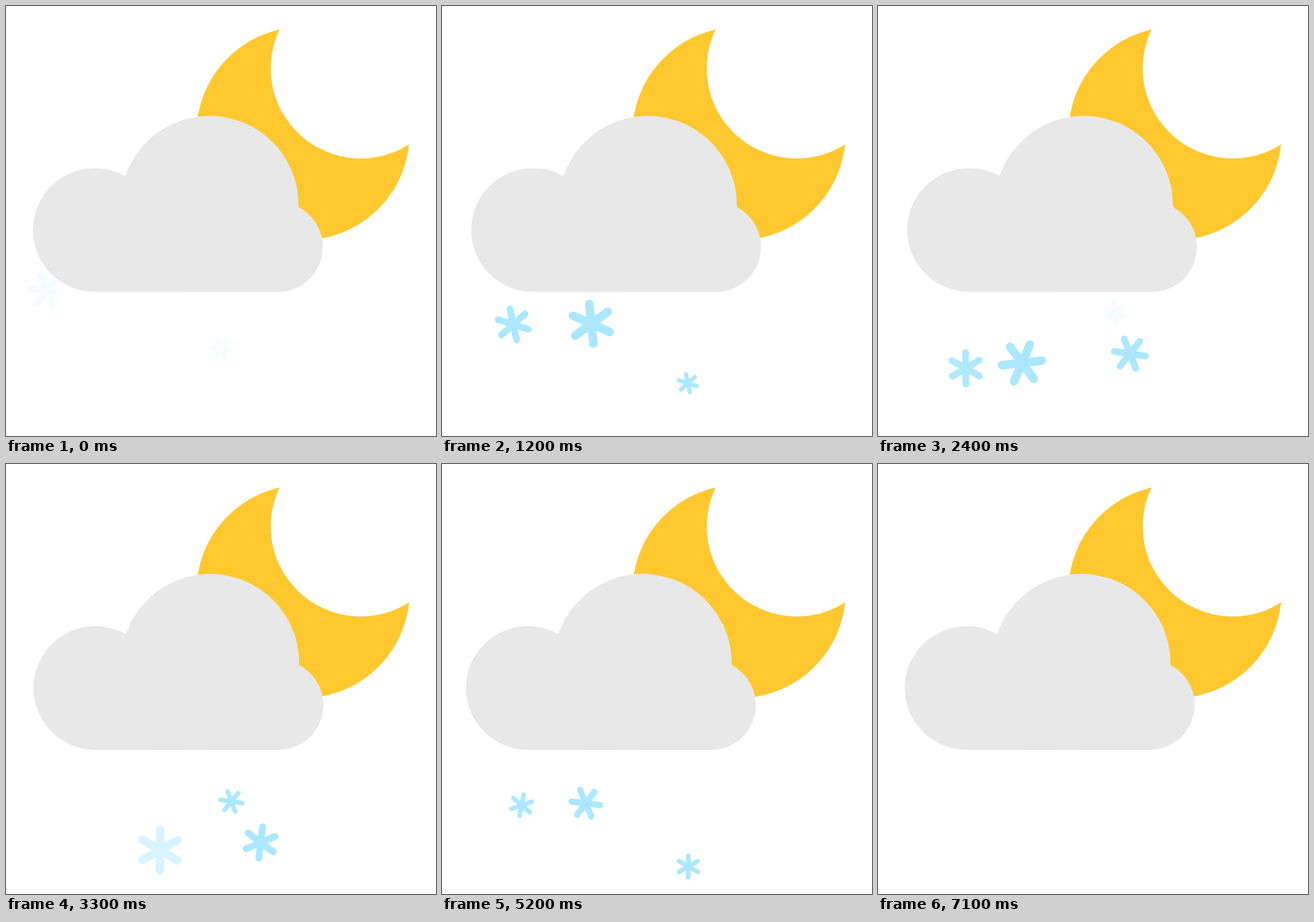
An HTML page with a canvas for the animation above (7200 ms loop, 640 by 640 pixels).

```html
<!DOCTYPE html>
<html lang="en">
<head>
<meta charset="utf-8">
<title>Snowy night</title>
<style>
html, body { margin: 0; width: 100%; height: 100%; overflow: hidden; background: #fff; }
canvas { display: block; width: 100vmin; height: 100vmin; }
</style>
</head>
<body>
<canvas id="stage" width="640" height="640"></canvas>
<script>
const ctx = document.getElementById('stage').getContext('2d');
const LOOP = 7200, STEP = 100, FADE = 200;
const DEGREE = Math.PI / 180;

// Velocity and bend in px per second, spin in degrees per second
const drift = { vx: 47.1, vy: 35.4, bendX: -7.3, bendY: 5.2, spin: -40.5 };
const hook = { vx: -27.5, vy: 48.5, bendX: 11, bendY: 0, spin: -25.3 };
const wideHook = { vx: -30.5, vy: 51, bendX: 12.5, bendY: 0, spin: -35.2 };

const flakes = [
  { ...drift, x: 59.3, y: 422.8, tilt: 37.6, size: 23.5, start: -25, life: 2615 },
  { ...drift, x: 319.2, y: 510.3, tilt: 37.6, size: 14, start: -25, life: 2075 },
  { ...hook, x: 230.5, y: 456, tilt: 2.7, size: 29.8, start: 850, life: 2546 },
  { ...wideHook, x: 392.7, y: 469, tilt: 12, size: 23.5, start: 1450, life: 2800 },
  { ...wideHook, x: 353, y: 455, tilt: 56.6, spin: -83.7, size: 16, start: 2375, life: 3150 },
  { ...drift, x: 56.2, y: 424.4, tilt: 25.9, size: 16, start: 3345, life: 2615 },
  { ...hook, x: 230.5, y: 456, tilt: 2.7, size: 21.5, start: 4190, life: 2546 }
];

function drawFlake(flake, time) {
  const age = (time - flake.start + LOOP) % LOOP;
  if (age >= flake.life) return;
  const s = age / 1000, { size } = flake;
  ctx.save();
  ctx.globalAlpha = Math.min(1, age / FADE, (flake.life - age) / FADE);
  ctx.translate(
    flake.x + flake.vx * s + flake.bendX * s * s,
    flake.y + flake.vy * s + flake.bendY * s * s
  );
  ctx.rotate((flake.tilt + flake.spin * s) * DEGREE);
  ctx.strokeStyle = '#abe8ff';
  ctx.lineWidth = size * 0.43;
  ctx.lineCap = 'round';
  ctx.beginPath();
  for (let arm = 0; arm < 3; arm++) {
    const dx = size * Math.sin(arm * 60 * DEGREE), dy = size * Math.cos(arm * 60 * DEGREE);
    ctx.moveTo(-dx, dy);
    ctx.lineTo(dx, -dy);
  }
  ctx.stroke();
  ctx.restore();
}

const angle = (cx, cy, [x, y]) => Math.atan2(y - cy, x - cx);

function arcBetween(cx, cy, r, from, to, reverse) {
  ctx.arc(cx, cy, r, angle(cx, cy, from), angle(cx, cy, to), reverse);
}

function drawMoon() {
  const top = [407, 35], right = [600, 206.3];
  ctx.fillStyle = '#ffc82f';
  ctx.beginPath();
  arcBetween(442.1, 189.7, 158.7, top, right, true);
  arcBetween(528, 93, 134, right, top);
  ctx.fill();
}

function drawCloud(time) {
  const phase = time / LOOP;
  const sway = phase < 0.25 ? phase : phase < 0.75 ? 0.5 - phase : phase - 1;
  const notchLeft = [177.3, 252], notchRight = [435.5, 299];
  ctx.save();
  ctx.translate(20 * sway, 0);
  ctx.fillStyle = '#e8e8e8';
  ctx.beginPath();
  arcBetween(132.3, 333.4, 92.2, [132.3, 425.6], notchLeft);
  arcBetween(302.9, 296.2, 132.6, notchLeft, notchRight);
  arcBetween(404.4, 358.7, 67.1, notchRight, [404.4, 425.8]);
  ctx.fill();
  ctx.restore();
}

function draw(now) {
  const time = Math.floor(now / STEP) * STEP % LOOP;
  ctx.fillStyle = '#fff';
  ctx.fillRect(0, 0, 640, 640);
  drawMoon();
  flakes.forEach(flake => drawFlake(flake, time));
  drawCloud(time);
}

const begin = performance.now();
function tick() {
  draw(performance.now() - begin);
  requestAnimationFrame(tick);
}
tick();
</script>
</body>
</html>
```
